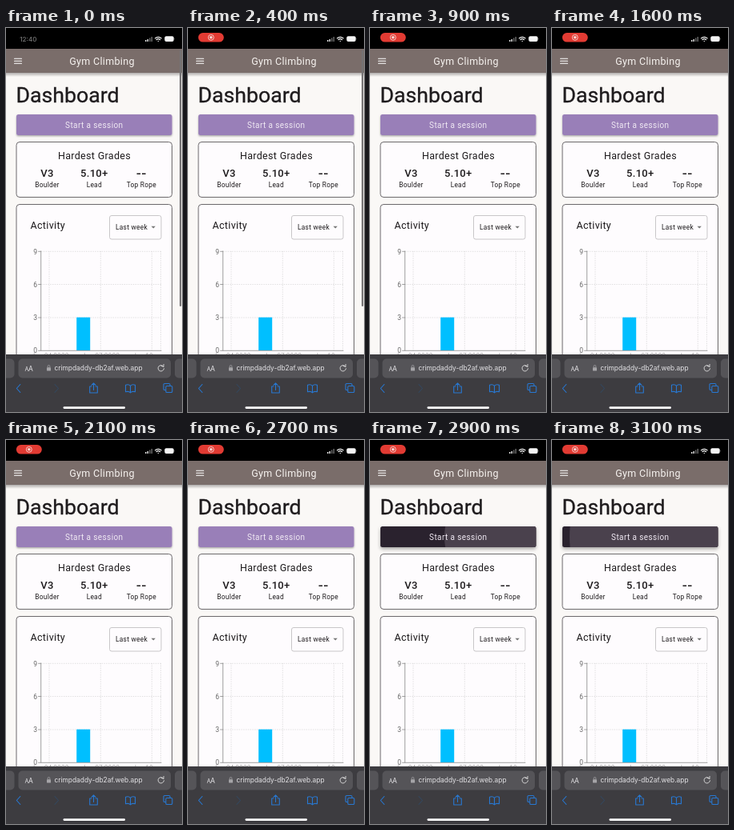
These frames come from a looping animation (220x480 px, 3.2 s). An HTML page:

```html
<!DOCTYPE html>
<html lang="en">
<head>
<meta charset="utf-8">
<title>Dashboard</title>
<style>
html, body { margin: 0; width: 100%; height: 100%; overflow: hidden; background: #000; }
svg { display: block; width: 220px; height: 480px; font-family: Roboto, sans-serif; fill: #1e1b1d; }
.line { fill: none; stroke-linecap: round; stroke-linejoin: round; }
.mid { text-anchor: middle; }
.card { fill: #fefcfe; stroke: #6c696c; }
.title { font-size: 26.7px; stroke: #1e1b1d; stroke-width: .3px; }
.small { font-size: 8.4px; letter-spacing: .25px; }
.head { font-size: 12.5px; letter-spacing: .33px; }
.grade { font-size: 13px; font-weight: 500; letter-spacing: .3px; }
.tick { font-size: 8.5px; fill: #666; }
.ui { font-family: Inter, sans-serif; fill: #e4e3e6; }
</style>
</head>
<body>
<svg viewBox="0 0 220 480">
  <defs>
    <clipPath id="buttonClip"><rect x="13" y="108" width="194.5" height="26" rx="2.5"/></clipPath>
    <linearGradient id="shade" x2="0" y2="1">
      <stop stop-color="#000" stop-opacity=".3"/>
      <stop offset="1" stop-color="#000" stop-opacity="0"/>
    </linearGradient>
    <filter id="drop" x="-10%" y="-30%" width="120%" height="180%">
      <feDropShadow id="shadow" dx="0" dy="1.2" stdDeviation="1.1" flood-opacity=".35"/>
    </filter>
  </defs>

  <rect y="30" width="220" height="386" fill="#faf8f6"/>

  <!-- App bar -->
  <rect y="56" width="220" height="5" fill="url(#shade)"/>
  <rect y="26" width="220" height="30" fill="#7a6d6a"/>
  <path class="line" d="M10.5 38.3h9M10.5 41.3h9M10.5 44.3h9" stroke="#fff" stroke-width="1.1"/>
  <text class="head mid" x="120" y="45.7" fill="#f6f2ef">Gym Climbing</text>

  <text class="title" x="12.5" y="92.8">Dashboard</text>

  <!-- Button -->
  <rect id="button" x="13" y="108" width="194.5" height="26" rx="2.5" filter="url(#drop)"/>
  <circle id="ripple" cx="165" cy="121" fill="#4a414d" clip-path="url(#buttonClip)"/>
  <text class="mid" x="110.3" y="124.6" font-size="10" letter-spacing=".4" fill="#f0e9f3">Start a session</text>

  <!-- Grades -->
  <rect class="card" x="13" y="142.5" width="194.5" height="69" rx="4"/>
  <text class="head mid" x="110.5" y="164.3">Hardest Grades</text>
  <g class="grade mid">
    <text x="51.5" y="186.2">V3</text>
    <text x="110.3" y="186.2">5.10+</text>
  </g>
  <path d="M163.5 181.6h4.6v1.4h-4.6zM170 181.6h4.6v1.4H170z"/>
  <g class="small mid">
    <text x="51.5" y="199.3">Boulder</text>
    <text x="110.3" y="199.3">Lead</text>
    <text x="169.3" y="199.3">Top Rope</text>
  </g>

  <!-- Activity -->
  <rect class="card" x="13" y="220.5" width="194.5" height="210" rx="4"/>
  <text class="head" x="30.5" y="251.3">Activity</text>
  <rect x="129.5" y="234.5" width="64.5" height="29.5" rx="2.5" fill="#fefcfe" stroke="#c8c6c8"/>
  <text class="small" x="137" y="252">Last week</text>
  <path d="M181.5 247.8h5.4l-2.7 2.7z" fill="#777"/>
  <path class="line" d="M44 279.3H194M44 320.5H194M44 362H194M54 279V403M118.3 279V403M182.3 279V403M193.5 279V403"
    stroke="#d8d7d8" stroke-width=".8" stroke-dasharray="1.4 1.4" style="stroke-linecap:butt"/>
  <rect x="88.2" y="361.7" width="17" height="41.3" fill="#00bfff"/>
  <path class="line" d="M43.7 279V403.3H194M40.5 279.3h3M40.5 320.5h3M40.5 362h3M40.5 403.3h3" stroke="#888" stroke-width=".8"/>
  <g class="tick" text-anchor="end">
    <text x="39" y="282.5">9</text>
    <text x="39" y="323.7">6</text>
    <text x="39" y="365">3</text>
    <text x="39" y="406.3">0</text>
  </g>
  <g class="tick mid" opacity=".6">
    <text x="55" y="412.5">Jan 04 2022</text>
    <text x="118.5" y="412.5">Jan 07 2022</text>
    <text x="171" y="412.5">Jan 10</text>
  </g>

  <rect id="scroll" x="217" y="27.5" width="2.2" height="320.5" rx="1.1" fill="#747274"/>

  <!-- Browser bar -->
  <rect y="408" width="220" height="72" fill="#3d3c40"/>
  <g fill="#555458">
    <rect x="-10" y="413.5" width="20.5" height="24" rx="5"/>
    <rect x="15.5" y="413.5" width="190.5" height="24" rx="5"/>
    <rect x="211" y="413.5" width="20" height="24" rx="5"/>
  </g>
  <g class="ui">
    <text x="23.5" y="429" font-size="7">A</text>
    <text x="28" y="429" font-size="8.4">A</text>
    <text class="mid" x="115.5" y="428.2" font-size="8.4">crimpdaddy-db2af.web.app</text>
  </g>
  <rect x="51" y="424.3" width="5" height="4.3" rx=".7" fill="#a5a4a7"/>
  <path class="line" d="M52.2 424v-1.2a1.3 1.3 0 0 1 2.6 0V424" stroke="#a5a4a7" stroke-width=".8"/>
  <path class="line" d="M197 423.4a3.7 3.7 0 1 0 .5 2.3M194 422.4l2.9 1 .2-3" stroke="#ddd" stroke-width=".9"/>
  <g class="line" stroke="#2878d2" stroke-width="1.1">
    <path d="M17.8 445.5l-4.5 5 4.5 5"/>
    <path d="M61 445.5l4.5 5-4.5 5" stroke="#34485f"/>
    <path d="M107 448h-2.3v8h9.6v-8H112M109.5 452.5v-8.3M107 446.3l2.5-2.4 2.5 2.4"/>
    <path d="M155.5 447.3c-1.5-1.6-4-1.7-6-1v8.5c2-.6 4.5-.5 6 1 1.5-1.5 4-1.6 6-1v-8.5c-2-.7-4.5-.6-6 1zv8.5"/>
    <rect x="199.8" y="447.5" width="8" height="8" rx="1.3"/>
    <path d="M199.5 452.5h-1.2a1.3 1.3 0 0 1-1.3-1.3v-5.4a1.3 1.3 0 0 1 1.3-1.3h5.4a1.3 1.3 0 0 1 1.3 1.3v1.4"/>
  </g>
  <rect x="71.5" y="473.3" width="77.5" height="2.6" rx="1.3" fill="#fff"/>

  <!-- Status bar -->
  <text id="clock" class="ui" x="17.3" y="16.5" font-size="8" font-weight="500" style="fill:#777">12:40</text>
  <g id="record">
    <rect x="12.8" y="6" width="32" height="11.6" rx="5.8" fill="#e23b33"/>
    <circle cx="28.8" cy="11.8" r="3.5" fill="none" stroke="#f6d5d2" stroke-width=".9"/>
    <circle cx="28.8" cy="11.8" r="1.8" fill="#f6d5d2"/>
  </g>
  <path d="M174 15h1.5v2H174zM176.5 14h1.5v3h-1.5z" fill="#ddd"/>
  <path d="M179 12.5h1.5V17H179zM181.5 11h1.5v6h-1.5z" fill="#666"/>
  <g class="line" stroke="#fff" stroke-width="1.3">
    <path d="M186.5 12.9a5.4 5.4 0 0 1 7.6 0M188 14.6a3.2 3.2 0 0 1 4.6 0"/>
    <path d="M190.3 16.3v.1"/>
  </g>
  <rect x="198.3" y="10.2" width="11.4" height="6.8" rx="2" fill="#f4f4f4"/>
  <path d="M210.3 12.4q1.2 1.2 0 2.4z" fill="#999"/>
</svg>
<script>
const el = id => document.getElementById(id);
const clamp = v => Math.min(1, Math.max(0, v));
const mix = (a, b, p) => `rgb(${a.map((v, i) => Math.round(v + (b[i] - v) * p))})`;
const LOOP = 3200, STEP = 100;
const PURPLE = [153, 127, 184], DARK = [41, 33, 46];

function draw(now) {
  const t = Math.floor(now % LOOP / STEP) * STEP;
  const recording = clamp(t / 400);
  el('record').style.opacity = recording;
  el('clock').style.opacity = 1 - recording;
  el('scroll').style.opacity = 1 - clamp((t - 500) / 400);

  // The press darkens and lifts the button while a ripple spreads from the right
  const press = clamp((t - 2700) / 200);
  el('button').setAttribute('fill', mix(PURPLE, DARK, Math.sqrt(press)));
  el('shadow').setAttribute('dy', 1.2 + press);
  el('shadow').setAttribute('stdDeviation', 1.1 + press);
  el('ripple').setAttribute('r', t > 2700 ? 72 + (t - 2900) * .355 : 0);
}

function tick() {
  draw(performance.now());
  requestAnimationFrame(tick);
}
tick();
</script>
</body>
</html>
```
